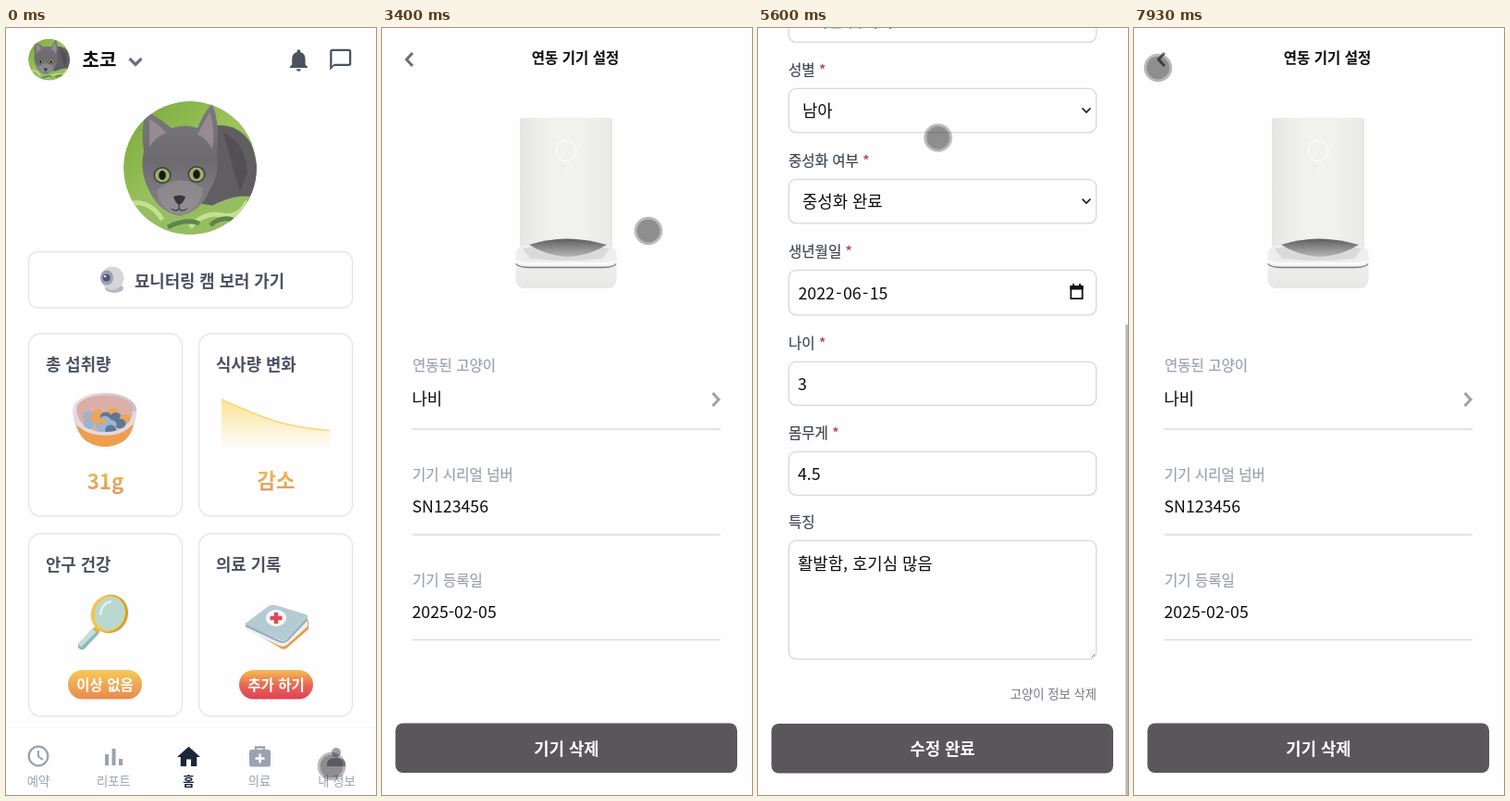
An HTML page that plays this animation: 400 px wide and 828 px high, repeating every 8000 ms.

```html
<!DOCTYPE html>
<html lang="ko">
<head>
<meta charset="utf-8">
<style>
html, body { margin: 0; width: 100%; height: 100%; overflow: hidden; background: #fefdff; }
svg { display: block; width: 100%; height: 100%; }
text { font-family: "Noto Sans CJK KR", "Noto Sans KR", "Noto Sans CJK", "Noto Sans CJK JP", sans-serif; white-space: pre; }
.medium { font-weight: 500; stroke: currentColor; stroke-width: .2px; }
.bold { font-weight: 700; }

.page { visibility: hidden; animation: 8s step-end infinite; }
#home { animation-name: home; }
#info { animation-name: info; }
#list { animation-name: list; }
#device { animation-name: device; }
#edit { animation-name: edit; }
@keyframes home { 0% { visibility: visible } 8.5%, 100% { visibility: hidden } }
@keyframes info { 0% { visibility: hidden } 8.5% { visibility: visible } 21.5%, 100% { visibility: hidden } }
@keyframes list { 0% { visibility: hidden } 21.5% { visibility: visible } 32%, 100% { visibility: hidden } }
@keyframes device { 0% { visibility: hidden } 32% { visibility: visible } 51.5% { visibility: hidden } 97%, 100% { visibility: visible } }
@keyframes edit { 0% { visibility: hidden } 51.5% { visibility: visible } 97%, 100% { visibility: hidden } }

#form { animation: scroll 8s linear infinite; }
@keyframes scroll {
  0%, 61% { transform: translateY(0); animation-timing-function: ease-in }
  64.1%, 64.8% { transform: translateY(-314px); animation-timing-function: ease-out }
  68%, 79% { transform: translateY(-528px); animation-timing-function: ease-in }
  80.8%, 81.6% { transform: translateY(-450px); animation-timing-function: ease-out }
  87%, 100% { transform: translateY(0) }
}
#thumb { animation: thumb 8s linear infinite; }
@keyframes thumb {
  0%, 61% { transform: translateY(0); opacity: 0; animation-timing-function: ease-in }
  61.1% { opacity: 1 }
  64.1%, 64.8% { transform: translateY(190px); animation-timing-function: ease-out }
  68%, 79% { transform: translateY(320px); animation-timing-function: ease-in }
  80.8%, 81.6% { transform: translateY(274px); animation-timing-function: ease-out }
  87% { transform: translateY(0); opacity: 1 }
  92%, 100% { transform: translateY(0); opacity: 0 }
}
#cursor { animation: cursor 8s ease-in-out infinite; }
@keyframes cursor {
  0%, 1% { transform: translate(352px, 797px) }
  5%, 9% { transform: translate(356px, 793px) }
  17.5%, 21.5% { transform: translate(330px, 330px) }
  26.625% { transform: translate(332px, 206px) }
  30%, 39.5% { transform: translate(333px, 137px) }
  42.5% { transform: translate(288px, 219px) }
  49%, 51.5% { transform: translate(350px, 402px) }
  55% { transform: translate(314px, 460px) }
  60.5% { transform: translate(205px, 590px) }
  64.1%, 64.8% { transform: translate(185px, 278px) }
  67% { transform: translate(182px, 130px) }
  74% { transform: translate(215px, 100px) }
  79% { transform: translate(227px, 98px); animation-timing-function: ease-in }
  80.8%, 81.6% { transform: translate(228px, 168px); animation-timing-function: ease-out }
  86.5%, 88% { transform: translate(232px, 610px) }
  95.5%, 100% { transform: translate(26px, 43px) }
}
</style>
</head>
<body>
<svg id="stage" viewBox="0 0 400 828" preserveAspectRatio="none"></svg>
<script>
// type sizes of a 360 px wide layout, scaled to the 400 px stage
const [SMALL, LABEL, BODY, HEAD, BIG] = [12, 14, 16, 18, 20].map(px => px * 400 / 360);
const SLATE = '#4b5162', MUTED = '#9ca1b0', INK = '#0c0c0f';

// y is the middle of the glyphs, not the baseline
const text = (s, x, y, size, color = INK, weight = '', anchor = 'start') =>
  `<text x="${x}" y="${y + size * .37}" font-size="${size}" fill="${color}" color="${color}" class="${weight}" text-anchor="${anchor}">${s}</text>`;
const centered = (s, x, y, size, color, weight) => text(s, x, y, size, color, weight, 'middle');
const box = (x, y, w, h, r, fill, stroke = 'none') =>
  `<rect x="${x}" y="${y}" width="${w}" height="${h}" rx="${r}" fill="${fill}" stroke="${stroke}" stroke-width="1.3"/>`;
const shape = (d, fill, extra = '') => `<path d="${d}" fill="${fill}" ${extra}/>`;
const line = (d, color, width, extra = '') => `<path d="${d}" fill="none" stroke="${color}" stroke-width="${width}" ${extra}/>`;
const oval = (x, y, rx, ry, fill, extra = '') => `<ellipse cx="${x}" cy="${y}" rx="${rx}" ry="${ry}" fill="${fill}" ${extra}/>`;
const dot = (x, y, r, fill, extra) => oval(x, y, r, r, fill, extra);
const at = (x, y, s, content) => `<g transform="translate(${x} ${y}) scale(${s})">${content}</g>`;
const page = (id, content) => `<g id="${id}" class="page">${content}</g>`;
const gradient = (id, stops, dir = 'x2="0" y2="1"') => `<linearGradient id="${id}" ${dir}>` +
  stops.map((c, i) => `<stop offset="${i / (stops.length - 1)}" stop-color="${c}"/>`).join('') + '</linearGradient>';

const next = (x, y, color, w = 3) => line(`M${x - 3.5} ${y - 7}L${x + 3} ${y}L${x - 3.5} ${y + 7}`, color, w);
const header = title => line('M33 27L26.5 34L33 41', '#6c6f7b', 3) + centered(title, 209, 32.5, LABEL, INK, 'bold');
const button = (label, y = 750.5) => box(14.5, y, 369.5, 53.5, 8, '#5a575a') + centered(label, 199.5, y + 27.5, BODY, '#fff', 'bold');

const defs = `<defs>
  ${gradient('gold', ['#f4c64c', '#dd9563'])}
  ${gradient('pillGold', ['#f6ca55', '#e78a50'])}
  ${gradient('pillRed', ['#f5bf52', '#e86a54', '#df4055'])}
  ${gradient('fade', ['#fbdc7acc', '#fbdc7a00'])}
  ${gradient('grass', ['#78a63b', '#9cc55c', '#84b346'], 'x2="1" y2="1"')}
  ${gradient('fur', ['#7d7a7f', '#6c6a6f', '#89868b'])}
  ${gradient('sun', ['#efc727', '#f8d83c'], 'x2="1" y2="0"')}
  ${gradient('tower', ['#e6e6e3', '#f1f1ee', '#f1f1ee', '#e9e9e6'], 'x2="1" y2="0"')}
  ${gradient('bowlDark', ['#5e5e5f', '#b7b7b8'])}
  ${gradient('base', ['#f3f3f2', '#e7e7e5'])}
  ${gradient('rim', ['#e9e0e6', '#c9bfc9'], 'x2="1" y2="0"')}
  <clipPath id="disc"><circle r="72"/></clipPath>
</defs>`;

const eye = (x, y) => oval(x, y, 9.5, 9, '#38393a') + oval(x, y, 8, 7.5, '#9cae6a') + oval(x, y, 3.8, 5, '#161817');
const greyCat = `<g clip-path="url(#disc)">
  ${dot(0, 0, 72, 'url(#grass)')}
  ${shape('M18-44Q50-52 66-26Q76 0 74 34Q46 46 10 38Z', '#605e63')}
  ${shape('M36-38Q58-30 62 4L54 26Q46-2 36-38Z', '#525055')}
  ${shape('M-47-61Q-36-56-20-43Q-4-48 8-43Q15-60 24-70Q33-46 29-18Q32 8 21 24Q12 47-11 52Q-33 48-43 27Q-55 6-50-18Q-54-44-47-61Z', 'url(#fur)')}
  ${shape('M-44-53Q-34-47-26-38Q-38-33-44-22Z', '#958b90')}
  ${shape('M21-60Q28-42 24-20Q18-32 8-36Z', '#958b90')}
  ${shape('M-36 24Q-12 4 14 22Q12 44-11 51Q-34 45-36 24Z', '#9a979b', 'opacity=".55"')}
  ${eye(-30, 8) + eye(7, 7)}
  ${shape('M-18 31Q-12 28-5 31Q-7 38-12 40Q-16 38-18 31Z', '#37363a')}
  ${line('M-12 39V44M-20 44Q-15 48-12 44Q-9 48-3 44', '#49474b', 1.5)}
  ${shape('M-72 33Q-48 24-34 42Q-12 62 18 44T72 32V72H-72Z', '#97bd62')}
  ${line('M-62 38Q-42 36-30 56M0 64Q15 47 34 51T62 36', '#c4e18c', 5)}
  ${line('M-24 64Q-5 54 10 60M22 62Q33 52 46 56', '#5d854d', 5)}
</g>`;

const yellowCat = `<g clip-path="url(#disc)">
  ${dot(0, 0, 72, 'url(#sun)')}
  ${shape('M-8 43Q-5 20 28 20Q60 20 76 48V76H-14Z', '#dcd8da')}
  ${shape('M46 16Q72 10 78 40L66 58Q45 46 46 16Z', '#343134')}
  ${shape('M-15-70Q-2-58 5-42Q21-39 32-27Q48-33 63-32Q57-15 46-4Q45 22 24 29Q3 35-18 29Q-37 15-32-10Q-30-28-20-40Q-22-55-15-70Z', '#695b4b')}
  ${shape('M-14-61L0-38L-17-37Z', '#a08677')}
  ${shape('M55-29L41-9L34-23Z', '#a08677')}
  ${line('M-10-38L-13-22M0-39L-3-22M11-38L8-20M22-32L17-15M36-22L28-8M43-5L28 4', '#3a332b', 2.5)}
  ${shape('M-8-25Q-5-3 7 4Q28 7 38 20Q20 34 0 38Q-28 32-34 12Q-31 0-20 0Q-11-10-8-25Z', '#f4f1f2')}
  ${oval(-17, -11, 6, 7, '#37312a') + oval(-17, -11, 4.5, 5.5, '#c8bd52') + dot(-16, -11, 2.7, '#111')}
  ${oval(9, 3, 8, 6, '#37312a') + oval(9, 3, 6.5, 4.8, '#c8bd52') + dot(9, 3, 2.8, '#111')}
  ${shape('M-23 9L-9 14L-18 20Z', '#b37669')}
  ${line('M-18 20Q-20 27-27 22M-18 20Q-13 28-5 24', '#9c8a86', 1.3)}
  ${line('M4 57Q15 42 28 39M20 70Q22 55 38 46', '#c5c0c3', 4)}
</g>`;

const kibble = Array.from({length: 14}, (_, i) => {
  const a = i * 2.4, r = 6.2 * Math.sqrt(i);
  return {x: 107 + r * Math.cos(a), y: 424 + r * .5 * Math.sin(a), fill: ['#9db4cd', '#e9a65c', '#5d7798'][i % 3]};
}).sort((a, b) => a.y - b.y).map(k => oval(k.x, k.y, 6, 5.2, k.fill)).join('');

const foodBowl =
  shape('M72 411Q73 434 85 445Q107 459 129 445Q141 434 141 409Z', '#e0d8de') +
  shape('M76 429Q80 441 87 446Q107 458 127 446Q135 440 138 428Q107 450 76 429Z', '#ef9e4d') +
  oval(106.5, 412, 34.5, 18, 'url(#rim)') + shape('M76 411A30.5 14.5 0 0 1 137 411Q137 433 107 438Q77 433 76 411Z', '#dcaea6') + kibble +
  line('M74 415Q78 438 107 438T139 414', '#e3dae1', 3.5);

const magnifier =
  line('M97 651L82 667', '#8fbab3', 8.5, 'stroke-linecap="round"') + line('M96 650L81 665', '#c5dfda', 5, 'stroke-linecap="round"') +
  line('M101 646L96 651', '#e8b03e', 6) +
  oval(112, 632.5, 19.5, 21, '#d99a30', 'transform="rotate(25 112 633)"') +
  oval(110.5, 632, 18.5, 20, '#f2c552', 'transform="rotate(25 110 632)"') +
  oval(112, 632, 16, 18, '#b9d9d0', 'transform="rotate(25 112 632)"') +
  line('M102 634Q103 621 114 619', '#e1f0ec', 2.5);

const medicalBook =
  shape('M259 647L296 669Q300 672 304 669L327 649V640L259 642Z', '#e69b4c') +
  shape('M259 643V649L296 667Q300 669 304 666L326 646V636Z', '#eceff2') +
  shape('M261 641L284 624Q287 622 291 623L324 633Q328 635 325 638L304 659Q300 663 295 660L261 646Q257 644 261 641Z', '#b5cbd4') +
  line('M259 645L295 662Q300 664 304 661L326 638', '#93acb9', 2) +
  oval(292, 637, 11, 9, '#f7f7f8') +
  line('M292 631V643M285.5 637H298.5', '#da4d55', 4.5);

const card = (x, y, title, content) =>
  box(x, y, 166, 197, 13, '#fefdff', '#e3e6ee') + text(title, x + 18.5, y + 33, BODY, SLATE, 'bold') + content;
const pill = (x, label, fill) => box(x, 693, 80, 31.5, 15.75, fill) + centered(label, x + 40, 709.5, LABEL, '#fff', 'bold');

const nav = active => {
  const tone = i => i === active ? '#1d2538' : MUTED;
  const labels = [['예약', 35], ['리포트', 116.5], ['홈', 197.5], ['의료', 274], ['내 정보', 357.5]];
  return line('M0 755H400', '#faf9fb', 1) +
    dot(35, 786, 10.3, 'none', `stroke="${tone(0)}" stroke-width="2.3"`) + line('M35 780V786.5L40 790', tone(0), 2) +
    shape('M107 784h4v12h-4zM114.5 778h4v18h-4zM122 789h4v7h-4z', tone(1)) +
    at(182.5, 772, 1.25, shape('M10 20v-6h4v6h5v-8h3L12 3 2 12h3v8z', tone(2))) +
    box(263, 779, 23, 18.5, 2.5, tone(3)) + line('M270 780V776.5H279V780', tone(3), 2.3) + line('M274.5 783.5V793.5M269.5 788.5H279.5', '#fff', 2.4) +
    dot(357, 782, 5, tone(4)) + shape('M347 797v-3q0-6 10-6t10 6v3z', tone(4)) +
    labels.map(([s, x], i) => centered(s, x, 813.5, SMALL, tone(i), i === active ? 'bold' : '')).join('');
};

const home = page('home',
  at(46.5, 34, .3125, greyCat) + text('초코', 82.5, 35, HEAD, INK, 'bold') +
  line('M133.5 33L140 39.5L146.5 33', '#6b7080', 3.2) +
  at(302, 20.3, 1.2, shape('M12 22c1.1 0 2-.9 2-2h-4c0 1.1.9 2 2 2zm6-6v-5c0-3.1-1.6-5.6-4.5-6.3V4c0-.8-.7-1.5-1.5-1.5s-1.5.7-1.5 1.5v.7C7.6 5.4 6 7.9 6 11v5l-2 2v1h16v-1z', SLATE)) +
  at(347.9, 20.4, 1.15, shape('M20 2H4c-1.1 0-2 .9-2 2v18l4-4h14c1.1 0 2-.9 2-2V4c0-1.1-.9-2-2-2zm0 14H6l-2 2V4h16z', SLATE, 'fill-rule="evenodd"')) +
  at(199, 151, 1, greyCat) +
  box(24.5, 241.5, 350, 60.5, 10, '#fefdff', '#e3e6ee') +
  oval(117, 281, 10, 5, '#b9bac1') + dot(115, 270, 12.5, '#d5d5da') + oval(109, 269.5, 7, 8, '#9aa1b5') + dot(108.5, 269.5, 4, '#4f5872') + dot(107, 268, 1.3, '#d9e4f7') +
  text('묘니터링 캠 보러 가기', 139, 273, BODY, SLATE, 'bold') +
  card(24.5, 330, '총 섭취량', foodBowl + centered('31g', 107.5, 489.5, BIG, 'url(#gold)', 'bold')) +
  card(208.5, 330, '식사량 변화',
    shape('M233 401C270 417 295 431 350 434.5V455H233Z', 'url(#fade)') + line('M233 401C270 417 295 431 350 434.5', '#f8d67a', 1.6) +
    centered('감소', 292, 489, BIG, 'url(#gold)', 'bold')) +
  card(24.5, 546, '안구 건강', magnifier + pill(67, '이상 없음', 'url(#pillGold)')) +
  card(208.5, 546, '의료 기록', medicalBook + pill(252, '추가 하기', 'url(#pillRed)')) +
  nav(2));

const info = page('info', centered('내 정보', 209, 32.5, LABEL, INK, 'bold') +
  text('연동 기기 설정', 33, 330, BODY, INK) + next(361, 330, MUTED) + line('M33 362H366', '#d9dbe3', 1.2) + nav(4));

const deviceCard = (y, serial, cat) => box(33, y, 333, 81, 8, '#fdea72') +
  text(`시리얼 번호 : ${serial}`, 60, y + 30, LABEL, '#47464a', 'bold') +
  text(`고양이 : ${cat}`, 60, y + 55, SMALL, '#4c4a45') + next(334, y + 42.5, '#403d3c');
const list = page('list', header('연동 기기 설정') + deviceCard(88, 'SN123456', '나비') + deviceCard(187, 'SN789012', '초코') + button('기기 추가'));

const feeder =
  box(149, 97, 100, 139, 1, 'url(#tower)') + dot(199, 132.5, 11, 'none', 'stroke="#fbfbfa" stroke-width="1.4"') +
  shape('M198 151h2v2h-2zM198 159h2v1h-2z', '#fafafa') +
  box(144.5, 235, 109, 46, 9, 'url(#base)') +
  shape('M149 236H249L253 252Q199 257 145 252Z', '#eeeeee') +
  shape('M152 238Q199 229 246 238L238 249Q199 253 160 249Z', '#dadadb') +
  shape('M159 234Q199 221 243 234Q224 246 201 247Q178 246 159 234Z', 'url(#bowlDark)') +
  line('M145 251.5Q147 254 158 254.5H240Q251 254 253 251.5', '#fafafa', 3) +
  line('M145 254.5Q147 258 158 258.5H240Q251 258 253 254.5', '#7d7d7e', 1.4);

const row = (label, value, y, gap, rule) => text(label, 33, y, LABEL, MUTED, 'medium') + text(value, 32.5, y + gap, BODY) + line(`M33 ${rule}H366`, '#d9dbe3', 1.3);
const device = page('device', header('연동 기기 설정') + feeder +
  row('연동된 고양이', '나비', 364, 36.5, 433) + next(361, 401, MUTED) +
  row('기기 시리얼 넘버', 'SN123456', 482.5, 34, 547) +
  row('기기 등록일', '2025-02-05', 596, 34, 660.5) + button('기기 삭제'));

const field = (label, required, value, y, h = 47, x = 43) =>
  text(label + (required ? ' <tspan fill="#e0383e">*</tspan>' : ''), 33, y - 20, LABEL, '#3f4453', 'medium') +
  box(33.3, y + .3, 332.4, h, 8, '#fefdff', '#d5d8e0') + text(value, x, y + Math.min(h, 49) / 2 + 1, BODY);
const select = (label, value, y) => field(label, true, value, y, 47.5, 48) + line(`M350.5 ${y + 21.5}l4.5 4.5l4.5-4.5`, '#1a1a1d', 1.7);
const dateValue = '2022-06-15'.split('-').join('<tspan dx="1.4">-</tspan><tspan dx="1.4"></tspan>').replace(/<tspan dx="1.4"><\/tspan>(\d+)/g, '<tspan dx="1.4">$1</tspan>');
const calendar = line('M338.3 807H350.7V820.2H338.3ZM341 804V807M348 804V807', '#111', 1.8) + box(337.5, 806, 14, 4.5, 1, '#111');

const edit = page('edit', `<g id="form">` + header('고양이 정보 수정') +
  text('반려묘의 정보를 입력해주세요.', 33, 104.5, HEAD, INK, 'bold') +
  text('모든 필수 정보를 입력해주세요.', 33, 138, SMALL, MUTED) +
  at(199, 246, 1, yellowCat) +
  field('이름', true, '나비', 390) +
  field('묘종', false, '코리안 숏헤어', 496) +
  select('성별', '남아', 593) +
  select('중성화 여부', '중성화 완료', 691) +
  field('생년월일', true, dateValue, 789, 48.5, 43.5) + calendar +
  field('나이', true, '3', 888) +
  field('몸무게', true, '4.5', 985) +
  field('특징', false, '활발함, 호기심 많음', 1081, 128) + line('M361 1207L364 1204', '#777', 1) +
  text('고양이 정보 삭제', 366, 1247.5, SMALL, '#74777f', '', 'end') +
  button('수정 완료', 1279) + '</g>' +
  `<g id="thumb">${box(397.3, 0, 3, 508, 1, '#b9b8ba')}</g>`);

const cursor = `<g id="cursor">${dot(0, 0, 15.3, '#000', 'fill-opacity=".27"') + dot(0, 0, 12.4, '#000', 'fill-opacity=".235"')}</g>`;

document.getElementById('stage').innerHTML = defs + box(0, 0, 400, 828, 0, '#fefdff') + home + info + list + device + edit + cursor;
</script>
</body>
</html>
```
